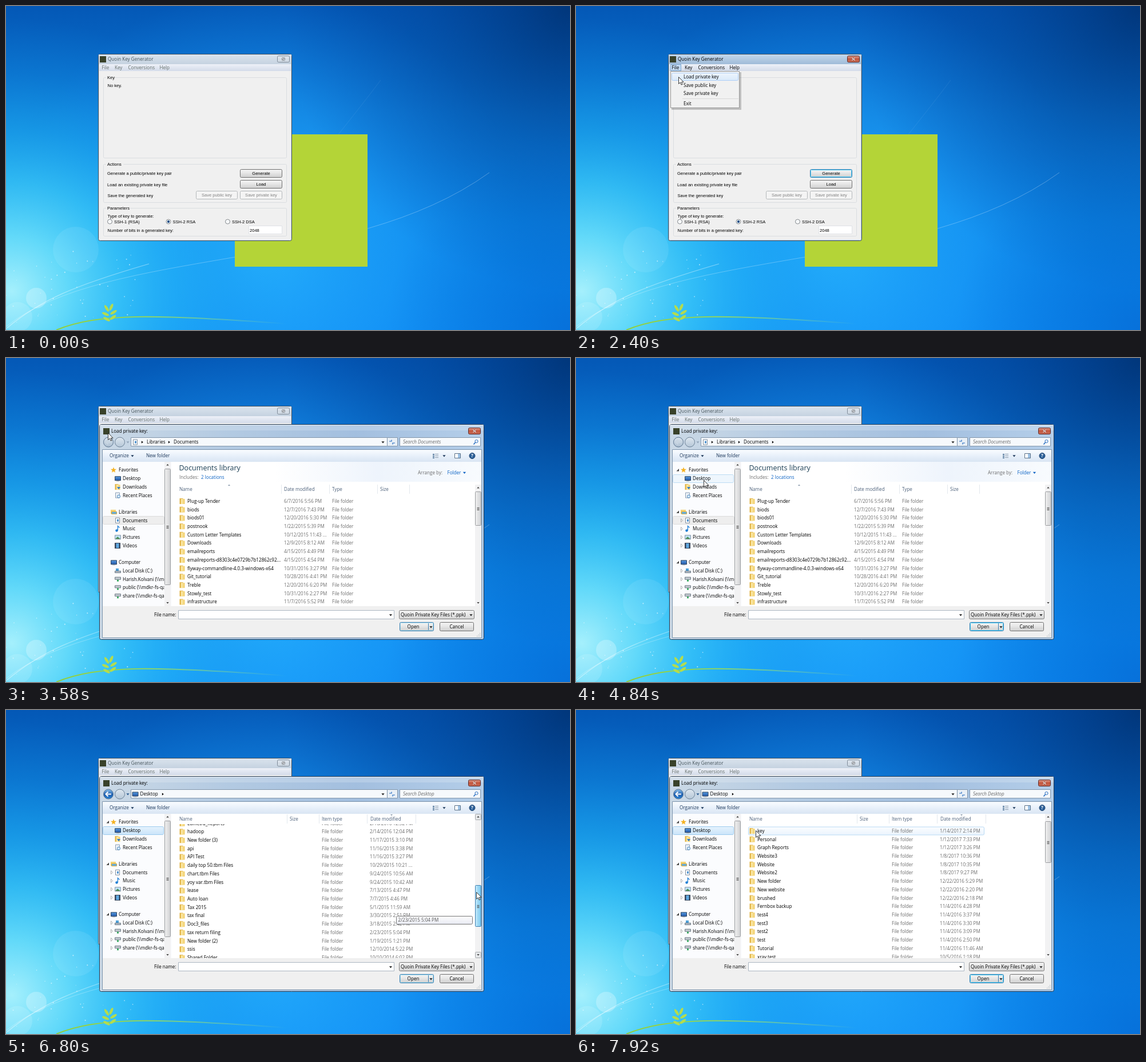
Recreate the animation shown at these times as an HTML page with a canvas. Size 986 by 568 pixels, loop 8 s.

```html
<!DOCTYPE html>
<html lang="en">
<head>
<meta charset="utf-8">
<title>Load a private key</title>
<style>
html, body { margin: 0; width: 100%; height: 100%; overflow: hidden; background: #0a74d0; }
canvas { display: block; }
</style>
</head>
<body>
<canvas id="stage" width="986" height="568"></canvas>
<script>
const W = 986, H = 568, LOOP = 8000, ROW = 14.71;
const g = document.getElementById('stage').getContext('2d');
const UI = '8.1px "Open Sans", "Noto Sans", sans-serif';
const CLASSIC = '7.55px "Liberation Sans", Arial, sans-serif';
const NAVY = '#1e395b', LINK = '#0a62c4', GREY = '#6d6d6d';

// ---------- drawing helpers ----------
function stops(gr, colors) {
  colors.forEach((c, i) => gr.addColorStop(i / (colors.length - 1), c));
  return gr;
}
const down = (y0, y1, ...colors) => stops(g.createLinearGradient(0, y0, 0, y1), colors);
const across = (x0, x1, ...colors) => stops(g.createLinearGradient(x0, 0, x1, 0), colors);

function box(x, y, w, h, fill, line, r = 0) {
  g.beginPath();
  if (line) g.roundRect(x + .5, y + .5, w - 1, h - 1, r);
  else g.roundRect(x, y, w, h, r);
  if (fill) { g.fillStyle = fill; g.fill(); }
  if (line) { g.strokeStyle = line; g.lineWidth = 1; g.stroke(); }
}
function disc(x, y, r, fill, line) {
  g.beginPath();
  g.arc(x, y, r, 0, 7);
  if (fill) { g.fillStyle = fill; g.fill(); }
  if (line) { g.strokeStyle = line; g.lineWidth = 1; g.stroke(); }
}
// y is the middle of the capitals
function text(s, x, y, color = '#000', font = UI, align = 'left') {
  g.font = font;
  g.fillStyle = color;
  g.textAlign = align;
  g.fillText(s, x, y + 2.9);
}
function path(points, color, width, close) {
  g.beginPath();
  points.forEach(([x, y]) => g.lineTo(x, y));
  if (close) g.closePath();
  if (width) { g.strokeStyle = color; g.lineWidth = width; g.stroke(); }
  else { g.fillStyle = color; g.fill(); }
}
function arrow(x, y, turn = 0, color = '#222', size = 2.6) {
  g.save();
  g.translate(x, y);
  g.rotate(turn * Math.PI / 2);
  path([[-size, -size / 2], [size, -size / 2], [0, size / 2 + .6]], color);
  g.restore();
}
function clipped(x, y, w, h, paint) {
  g.save();
  g.beginPath();
  g.rect(x, y, w, h);
  g.clip();
  paint();
  g.restore();
}
function faded(alpha, paint) {
  if (alpha <= 0) return;
  g.save();
  g.globalAlpha *= Math.min(1, alpha);
  paint();
  g.restore();
}
function button(x, y, w, h, label, font, { glow = 0, off } = {}) {
  const fill = off ? '#f4f4f4' : down(y, y + h, '#f4f4f4', '#ececec', '#dcdcdc', '#cfcfcf');
  box(x, y, w, h, fill, off ? '#b4b8ba' : glow ? '#3c7fb1' : '#707070', 2);
  if (glow) faded(glow, () => box(x + 1, y + 1, w - 2, h - 2, null, '#3cc8f4', 1));
  text(label, x + w / 2, y + h / 2, off ? '#838383' : '#000', font, 'center');
}
function closeButton(x, y, w, h, red) {
  box(x, y, w, h, red ? down(y, y + h, '#e0a596', '#c4553c', '#c9715c') : down(y, y + h, '#dfe6ee', '#ccd6e1'),
    red ? '#5a2a2a' : '#7f8b98', 2);
  const cx = x + w / 2, cy = y + h / 2;
  for (const d of [-1, 1]) {
    const line = [[cx - 2.5, cy - 2.2 * d], [cx + 2.5, cy + 2.2 * d]];
    path(line, red ? '#8b3a2b' : '#444d57', 2.6);
    path(line, '#fff', 1.3);
  }
}
const appIcon = (x, y) => box(x, y, 11, 11, '#39422a');

const icons = {
  folder(x, y) {
    box(x - 4.5, y - 5, 6, 10, '#e3b64c');
    box(x - 2, y - 4, 6.5, 9, across(x - 2, x + 5, '#fdeeb0', '#efc95f'));
  },
  star(x, y) {
    path([...Array(10)].map((_, i) => {
      const r = i % 2 ? 2.3 : 5.3, a = i * Math.PI / 5 - Math.PI / 2;
      return [x + r * Math.cos(a), y + r * Math.sin(a)];
    }), '#f5b324', 0, true);
  },
  screen(x, y) {
    box(x - 5, y - 4, 11, 8, down(y - 4, y + 4, '#5aa0e6', '#1c4fa0'), '#34485f');
    box(x - 2, y + 4, 5, 1, '#8a98a8');
  },
  down(x, y) {
    icons.folder(x, y);
    arrow(x + 2, y + 2, 0, '#2374d0', 3.2);
  },
  recent(x, y) {
    box(x - 4, y - 5, 8, 10, '#eef3f8', '#8a9db4');
    disc(x + 2, y + 2, 2.6, '#d7ecff', '#4d85b8');
  },
  library(x, y) {
    box(x - 5, y - 4, 9, 7, '#f4d273');
    box(x - 4, y - 1, 10, 5, '#62b0e6', '#d9a93a');
  },
  doc(x, y) {
    box(x - 4, y - 5, 8, 10, '#fff', '#7f8d9c');
    box(x - 1, y - 2, 3, 4, '#4f93d0');
  },
  music(x, y) {
    disc(x - 1.5, y + 3, 2.2, '#1f7fd4');
    path([[x + .4, y + 3], [x + .4, y - 5], [x + 3.5, y - 2]], '#1f7fd4', 1.3);
  },
  picture(x, y) {
    box(x - 5, y - 4, 11, 8, '#bfe2f7', '#8a98a8');
    path([[x - 4, y + 3], [x, y - 1], [x + 5, y + 3]], '#4a8f55');
  },
  video(x, y) {
    box(x - 5, y - 5, 10, 10, '#39465a');
    box(x - 2.5, y - 4, 5, 8, '#5fa8e2');
  },
  drive(x, y) {
    box(x - 5, y, 11, 4, '#b9c2cb', '#6d7883');
    box(x - 3, y - 4, 5, 4, '#4d9fd6');
  },
  net(x, y) {
    box(x - 5, y - 4, 11, 5, '#c3cbd2', '#707a84');
    box(x - 1, y + 1, 3, 3, '#38a860');
  },
  user(x, y) {
    icons.folder(x, y);
    disc(x + 1, y + 1, 2.2, '#4d7f5d');
  },
  shortcut: (x, y) => box(x - 4.5, y - 4.5, 9, 9, '#3a8fd8'),
};

// ---------- wallpaper ----------
function paintWallpaper() {
  const wash = paint => { g.fillStyle = paint; g.fillRect(0, 0, W, H); };
  const glow = (x, y, r, ...colors) => wash(stops(g.createRadialGradient(x, y, 0, x, y, r), colors));
  wash(down(0, H, '#0458b6', '#0a76d4', '#0b88ea', '#0a88f2'));
  glow(450, 430, 460, 'rgba(40,180,255,.85)', 'rgba(34,164,252,.5)', 'rgba(24,140,240,0)');
  glow(10, 500, 480, 'rgba(170,243,253,.97)', 'rgba(110,228,251,.88)', 'rgba(62,206,248,.72)',
    'rgba(36,184,244,.45)', 'rgba(24,160,236,.2)', 'rgba(20,150,235,0)');
  glow(986, 0, 500, 'rgba(0,46,108,.8)', 'rgba(0,56,135,.36)', 'rgba(0,60,150,0)');
  glow(986, 568, 320, 'rgba(0,70,175,.35)', 'rgba(0,80,180,0)');

  const curve = (color, width, ...p) => {
    g.beginPath();
    g.moveTo(p[0], p[1]);
    g.bezierCurveTo(...p.slice(2));
    g.strokeStyle = color;
    g.lineWidth = width;
    g.stroke();
  };
  curve('rgba(255,255,255,.28)', 1, 0, 562, 180, 420, 600, 470, 845, 292);
  curve('rgba(255,255,255,.4)', 1.2, 0, 566, 60, 515, 120, 490, 250, 452);
  curve('rgba(255,255,255,.08)', 1, 655, 130, 610, 190, 560, 250, 500, 330);
  disc(122, 427, 40, 'rgba(255,255,255,.08)');
  disc(53, 512, 18, 'rgba(255,255,255,.25)');
  disc(20, 545, 26, 'rgba(255,255,255,.12)');

  let seed = 7;
  const random = () => (seed = seed * 16807 % 2147483647) / 2147483647;
  for (let i = 0; i < 45; i++)
    disc(random() * 240, 430 + random() * 125, .4 + random() * .7, 'rgba(255,255,255,.6)');

  curve(across(88, 490, '#8fce3c', '#9ad84a', 'rgba(150,225,120,.5)', 'rgba(150,225,160,0)'), 2,
    88, 568, 160, 538, 260, 540, 490, 557);
  for (const [x, y, a] of [[176, 530, 1], [184, 528, 2], [174, 540, .4], [188, 537, 2.6], [176, 549, .5], [187, 546, 2.5]]) {
    g.beginPath();
    g.ellipse(x, y, 6.5, 2.4, a, 0, 7);
    g.fillStyle = '#b5dc4c';
    g.fill();
  }
  box(400, 225, 232, 232, '#b4d437');
}

// ---------- key generator window ----------
function generator(t) {
  const active = t >= 1930 && t < 3110;
  box(161, 84, 339, 328, active ? '#a9c4e0' : '#cfdae6', '#46535f', 3);
  box(162, 85, 337, 17, active ? down(85, 102, '#c4d8ec', '#9fbbd8') : down(85, 102, '#dbe4ee', '#c5d2e0'));
  box(163, 102, 335, 12, down(102, 114, '#eef1f8', '#d3dbe9'));
  box(163, 114, 335, 296, '#f0f0f0');
  appIcon(164, 88);
  text('Quoin Key Generator', 178, 93, active ? '#000' : '#46555c');
  closeButton(474, 87, 22, 12, active);
  if (t >= 2010 && t < 3030) box(165, 102, 19, 12, '#c3dbf3', '#7da7d0');
  const menuColor = active ? '#000' : '#66706c';
  [['File', 167.5], ['Key', 190], ['Conversions', 213.5], ['Help', 268.5]]
    .forEach(([s, x]) => text(s, x, 108, menuColor));

  const label = (s, x, y) => text(s, x, y, '#000', CLASSIC);
  [['Key', 125, 142], ['Actions', 277, 68], ['Parameters', 354, 50]].forEach(([s, y, h]) => {
    box(170, y, 321, h, null, '#dadde0', 2);
    box(175, y - 1, s.length * 3.9 + 3, 3, '#f0f0f0');
    label(s, 177, y);
  });
  label('No key.', 177.5, 139);
  label('Generate a public/private key pair', 177, 293.5);
  label('Load an existing private key file', 177, 313.5);
  label('Save the generated key', 177.5, 332);
  label('Type of key to generate:', 177.5, 368);
  label('Number of bits in a generated key:', 177.5, 393);
  button(409, 286, 74, 15, 'Generate', CLASSIC, { glow: t >= 1930 ? .9 : 0 });
  button(409, 305, 74, 15, 'Load', CLASSIC);
  button(332, 324, 73, 15, 'Save public key', CLASSIC, { off: true });
  button(409, 324, 74, 15, 'Save private key', CLASSIC, { off: true });
  [['SSH-1 (RSA)', 181.5], ['SSH-2 RSA', 284], ['SSH-2 DSA', 387.5]].forEach(([s, x], i) => {
    disc(x, 378, 4, '#f7f9fa', '#85898d');
    if (i === 1) disc(x, 378, 2.2, '#1b4f86');
    label(s, x + 7.5, 378);
  });
  box(424, 385, 59, 15, '#fff', '#dfe2e6');
  label('2048', 426, 393);

  if (t >= 2010 && t < 3030) faded(t < 2090 ? .6 : 1, () => {
    box(167, 116, 122, 66, 'rgba(0,0,0,.2)');
    box(165, 114, 121, 65, '#f1f1f1', '#979797');
    if (t >= 2320) box(167, 117, 117, 14, down(117, 131, '#eef5fd', '#d9e9fa'), '#aecff7', 2);
    ['Load private key', 'Save public key', 'Save private key', 'Exit']
      .forEach((s, i) => text(s, 188, 124 + i * 14.7 + (i === 3 ? 3 : 0)));
    box(186, 162, 98, 1, '#d8d8d8');
  });
}

// ---------- file dialog ----------
const parse = s => s.trim().split('\n').map(line => line.split('|'));
const documents = parse(`
Plug-up Tender|6/7/2016 5:56 PM
biods|12/7/2016 7:43 PM
biods01|12/20/2016 5:30 PM
postnook|1/22/2015 5:39 PM
Custom Letter Templates|10/12/2015 11:43 ...
Downloads|12/9/2015 8:12 AM
emailreports|4/15/2015 4:49 PM
emailreports-d8303c4e0729b7b12862c92...|4/15/2015 4:54 PM
flyway-commandline-4.0.3-windows-x64|10/31/2016 3:27 PM
Git_tutorial|10/28/2016 4:41 PM
Treble|12/20/2016 6:20 PM
Stowly_test|10/31/2016 2:27 PM
infrastructure|11/7/2016 5:52 PM`);
const desktop = parse(`
key|1/14/2017 2:14 PM
Personal|1/12/2017 7:33 PM
Graph Reports|1/12/2017 3:26 PM
Website3|1/8/2017 10:36 PM
Website|1/8/2017 10:35 PM
Website2|1/8/2017 9:27 PM
New folder|12/22/2016 5:29 PM
New website|12/22/2016 2:20 PM
brushed|12/22/2016 2:18 PM
Fernbox backup|11/4/2016 4:28 PM
test4|11/4/2016 3:37 PM
test3|11/4/2016 3:30 PM
test2|11/4/2016 3:09 PM
test|11/4/2016 2:50 PM
Tutorial|11/4/2016 11:46 AM
xray test|10/5/2016 1:18 PM
Lumetra_Reports|2/16/2016 12:52 PM
hadoop|2/14/2016 12:04 PM
New folder (3)|11/17/2015 3:10 PM
api|11/16/2015 3:38 PM
API Test|11/16/2015 3:27 PM
daily top 50.tbm Files|10/29/2015 10:21 ...
chart.tbm Files|9/24/2015 10:56 AM
yoy var.tbm Files|9/24/2015 10:42 AM
lease|7/13/2015 4:47 PM
Auto loan|7/7/2015 4:46 PM
Tax 2015|5/1/2015 11:59 AM
tax final|3/30/2015 2:51 PM
Doc3_files|3/18/2015 2:42 PM
tax return filing|2/23/2015 5:04 PM
New folder (2)|1/19/2015 1:21 PM
ssis|12/10/2014 5:22 PM
Shared Folder|10/10/2014 6:02 PM
Passport|8/11/2014 7:14 PM
QVR|11/3/2015 3:23 PM|shortcut
Network||net
Computer||screen
Harish Kolvani||user
Libraries||library`);
// name, icon, row; headings sit further left
const tree = [
  ['Favorites', 'star', 0, 1], ['Desktop', 'screen', 1], ['Downloads', 'down', 2], ['Recent Places', 'recent', 3],
  ['Libraries', 'library', 5, 1], ['Documents', 'doc', 6], ['Music', 'music', 7], ['Pictures', 'picture', 8], ['Videos', 'video', 9],
  ['Computer', 'screen', 11, 1], ['Local Disk (C:)', 'drive', 12], ['Harish.Kolvani (\\\\mdkr', 'net', 13],
  ['public (\\\\mdkr-fs-qa', 'net', 14], ['share (\\\\mdkr-fs-qa', 'net', 15]];

function scrollbar(x, top, thumb, size, { hot, w = 11 } = {}) {
  box(x, top, w, 435 - top, '#f2f2f3');
  if (hot) [top, 424].forEach(y => box(x, y, w, 11, '#e6e8ea', '#a5a9ad', 1));
  arrow(x + w / 2, top + 5.5, 2, '#444', 2.2);
  arrow(x + w / 2, 429, 0, '#444', 2.2);
  const fill = hot ? across(x, x + w, '#c9ecfb', '#72c4ee') : across(x, x + w, '#f2f2f2', '#cfd0d2');
  box(x, thumb, w, size, fill, hot ? '#3c7fb1' : '#9a9c9f', 1);
  for (let i = -1; i < 2; i++) box(x + w / 2 - 2, Math.round(thumb + size / 2) + i * 2, 4, 1, '#555');
}

function sidebar(t) {
  const onDesktop = t >= 5150;
  box(169, 182, 121, 253, '#fbfcfe');
  if (onDesktop) box(169, 204, 107, 15, down(204, 219, '#e6f3fd', '#c9e4fa'), '#9ccbee', 2);
  else {
    box(169, 277, 108, 15, '#eeeeee', '#dcdcdc', 2);
    if (t >= 4600) box(169, 204, 107, 15, '#eef6fd', '#bcdcf4', 2);
  }
  clipped(169, 182, 107.5, 253, () => tree.forEach(([name, icon, row, head]) => {
    const y = 196.5 + row * ROW;
    icons[icon](head ? 188 : 195, y);
    text(name, head ? 197 : 204, y);
    faded((t - 4200) / 300, () => {
      if (head) path([[175.5, y + 2], [180, y + 2], [180, y - 2.5]], '#444', 0, true);
      else if (row > 4) path([[183.5, y - 3], [186.7, y], [183.5, y + 3]], '#a0a0a0', .8, true);
    });
  }));
  scrollbar(277, 182, 194, 204);
}

function columns(y, top, names, lines) {
  names.forEach(([s, x]) => text(s, x, y, '#4c607a'));
  lines.forEach(x => box(x, top, 1, 16, '#e3e8ee'));
}
const rowBox = (y, fill, line) => box(301, y - 7.5, 413, 15, fill, line, 2);

function documentList() {
  box(290, 182, 541, 35, across(290, 831, '#fff', '#fff', '#eef4fc', '#f8fbfe'));
  text('Documents library', 302.5, 194, '#1c3f54', '12.5px "Open Sans", "Noto Sans", sans-serif');
  text('Includes:', 303, 209, GREY);
  text('2 locations', 341, 209, LINK);
  text('Arrange by:', 720, 201, GREY);
  text('Folder', 771.5, 201, LINK);
  arrow(801.5, 201, 0, LINK);
  columns(230, 222, [['Name', 303], ['Date modified', 486], ['Type', 570], ['Size', 654]], [481, 565, 649, 705]);
  arrow(390, 223, 2, '#8a9aac', 2);
  documents.forEach(([name, date], i) => {
    const y = 251 + i * ROW;
    icons.folder(308, y);
    text(name, 317, y);
    text(date, 486, y, GREY);
    text('File folder', 570, y, GREY);
  });
  scrollbar(820, 222, 234, 60);
}

function desktopList(t, cursor) {
  const dragging = t >= 6640 && t < 7420;
  const thumb = t < 6640 ? 350 : dragging ? Math.max(195, Math.min(350, cursor.y - 12)) : 195;
  const scroll = (thumb - 195) / 155 * 344.1;
  const rowY = i => 212 + i * ROW - scroll;
  const hover = cursor.x > 301 && cursor.x < 714 && cursor.y > 200 && !dragging
    ? Math.floor((cursor.y - rowY(-.5)) / ROW) : -1;
  columns(191.5, 183, [['Name', 303], ['Size', 496], ['Item type', 552], ['Date modified', 637]], [491, 547, 631, 716]);
  arrow(674, 184, 0, '#8a9aac', 2);
  clipped(290, 200, 529, 235, () => desktop.forEach(([name, date, icon = 'folder'], i) => {
    const y = rowY(i);
    if (y < 190 || y > 445) return;
    if (i === 38) rowBox(y, down(y - 7, y + 7, '#fafafa', '#ebebeb'), '#d9d9d9');
    if (i === hover) rowBox(y, down(y - 7, y + 7, '#fbfdff', '#ebf4fd'), '#b8d9f4');
    icons[icon](308, y);
    text(name, 317, y);
    text(date, 636, y, GREY);
    if (date) text(icon === 'shortcut' ? 'Internet Shortcut' : 'File folder', 552, y, GREY);
    if (icon === 'shortcut') text('1 KB', 543, y, GREY, UI, 'right');
  }));
  scrollbar(820, 182, thumb, 73, { hot: dragging || t >= 6490 && t < 6640 });
  if (dragging && t >= 6720) {
    const top = thumb + 54;
    box(682, top, 134, 15, down(top, top + 15, '#fff', '#e6e8f1'), '#767676', 2);
    text(desktop[Math.min(38, Math.round((177 + scroll) / ROW))][1], 685.5, top + 7.5, '#575757');
  }
}

function dialog(t, cursor) {
  const onDesktop = t >= 5150;
  box(163, 116, 673, 378, across(163, 836, '#cbd9e6', '#b3cae2', '#a3bfdf', '#b4cee9'), '#20364e', 3);
  box(164, 117, 671, 10, 'rgba(255,255,255,.18)');
  box(164, 117, 671, 1, 'rgba(255,255,255,.7)');
  appIcon(170, 123);
  text('Load private key:', 184, 128.5);
  closeButton(808, 122, 22, 12, true);

  disc(179, 147.5, 8.5, onDesktop ? down(139, 157, '#8cc3ee', '#1c5cae', '#2f8ad8') : down(139, 157, '#dce6ef', '#a9bccf'), '#5d7690');
  disc(199, 147.5, 8.5, down(139, 157, '#dfe8f0', '#b3c5d6'), '#6c8298');
  const back = onDesktop ? '#fff' : '#c9d6e2';
  path([[184, 147.5], [175, 147.5]], back, 2);
  path([[178.5, 143.5], [174.5, 147.5], [178.5, 151.5]], back, 2);
  arrow(213, 147.5, 0, onDesktop ? '#2b5a8f' : '#94a7ba');

  box(218, 139, 449, 16, '#f6f9fc', '#8296ab');
  box(666, 139, 19, 16, '#e9f0f7', '#8296ab');
  box(688, 139, 142, 16, '#f6f9fc', '#8296ab');
  arrow(659, 147.5);
  path([[670, 146], [674, 146], [674, 143.5]], '#2a6ec0', 1.2);
  path([[680, 149], [676, 149], [676, 151.5]], '#2a6ec0', 1.2);
  if (onDesktop) {
    icons.screen(225.5, 147.5);
    text('Desktop', 234.5, 147.5);
    if (t >= 6010) arrow(274, 147.5, 3, '#000', 2.3);
  } else {
    icons.doc(226, 147.5);
    arrow(238, 147.5, 3, '#000', 2.3);
    text('Libraries', 246, 147.5);
    arrow(285, 147.5, 3, '#000', 2.3);
    text('Documents', 293, 147.5);
    if (t >= 3730) arrow(344, 147.5, 3, '#000', 2.3);
  }
  text('Search ' + (onDesktop ? 'Desktop' : 'Documents'), 694, 147.5, GREY, 'italic ' + UI);
  disc(822.5, 146, 2.6, null, '#2a6ec0');
  path([[820.5, 148], [817.5, 151.5]], '#2a6ec0', 1.6);

  box(168, 160, 664, 331, '#f0f0f0', '#7c93ab');
  box(169, 161, 662, 21, down(161, 182, '#f9fcff', '#e8f0fa', '#d9e5f3'));
  text('Organize', 181, 171.5, NAVY);
  arrow(221, 171.5, 0, NAVY);
  text('New folder', 245, 171.5, NAVY);
  for (let i = 0; i < 3; i++) {
    box(746, 168 + i * 3, 3, 2, '#5d7f9f');
    box(750, 168 + i * 3, 6, 1, '#8a9aac');
  }
  arrow(766, 171.5, 0, NAVY);
  box(784, 167, 11, 9, '#fff', '#5d7288');
  box(790, 168, 4, 7, '#9fc3e6');
  disc(815, 171.5, 5, '#2b5f98', '#1d416c');
  text('?', 815, 171.5, '#fff', 'bold ' + UI, 'center');

  box(169, 182, 662, 253, '#fff');
  sidebar(t);
  onDesktop ? desktopList(t, cursor) : documentList();

  text('File name:', 297.5, 450, '#000', UI, 'right');
  box(301, 442, 378, 16, '#fff', '#abb6c2');
  arrow(672.5, 450.5);
  box(687, 442, 132, 16, down(442, 458, '#f4f4f4', '#e6e6e6', '#d2d2d2'), '#7d7d7d', 2);
  text('Quoin Private Key Files (*.ppk)', 690, 450);
  arrow(813, 450.5);
  const pulse = .65 + .35 * Math.cos((t - 7920) / 3000 * 2 * Math.PI);
  button(688, 463, 60, 16, '', UI, { glow: pulse });
  text('Open', 712, 471, '#000', UI, 'center');
  box(738, 465, 1, 12, '#3c7fb1');
  arrow(743, 471.5);
  button(758, 463, 60, 16, 'Cancel', UI);
  for (let i = 0; i < 3; i++)
    for (let j = 0; j <= i; j++) box(828 - j * 2.5, 482 + i * 2.5, 1.2, 1.2, '#b5bcc4');
}

// ---------- pointer ----------
const moves = [
  [290, 791, 512], [1070, 203, 139], [1460, 180, 109], [1540, 180, 109], [1700, 175, 108], [2160, 175, 108],
  [2480, 180, 127], [3340, 180, 127], [3580, 178, 131], [3880, 178, 131], [4760, 224, 215], [5000, 219, 212],
  [5070, 219, 212], [5690, 389, 222], [5930, 470, 250], [6560, 822, 362], [6650, 822, 362], [6785, 822, 319],
  [7030, 822, 235], [7120, 822, 235], [7360, 822, 207], [7420, 822, 207], [7880, 314, 211], [8000, 314, 211]];

function pointer(time) {
  // the screen was sampled about 13 times a second
  const t = 290 + Math.floor((time - 290) / 78.3 + .15) * 78.3;
  const i = Math.max(1, moves.findIndex(m => m[0] > t));
  const [t0, x0, y0] = moves[i - 1], [t1, x1, y1] = moves[i];
  const u = Math.max(0, Math.min(1, (t - t0) / (t1 - t0))), e = u * u * (3 - 2 * u);
  return { x: Math.round(x0 + (x1 - x0) * e), y: Math.round(y0 + (y1 - y0) * e) };
}
function drawPointer({ x, y }) {
  const shape = [[0, 0], [0, 12], [2.8, 9.4], [4.6, 13.6], [6.6, 12.8], [4.8, 8.8], [8.6, 8.8]]
    .map(([a, b]) => [x + .5 + a, y + .5 + b]);
  path(shape, '#fff', 0, true);
  path(shape, '#222', .9, true);
}

// ---------- playback ----------
paintWallpaper();
const wallpaper = document.createElement('canvas');
wallpaper.width = W;
wallpaper.height = H;
wallpaper.getContext('2d').drawImage(g.canvas, 0, 0);

function frame() {
  const t = performance.now() % LOOP;
  const cursor = pointer(t);
  g.drawImage(wallpaper, 0, 0);
  generator(t);
  if (t >= 3420) faded(t < 3500 ? .35 : t < 3580 ? .75 : 1, () => dialog(t, cursor));
  if (t >= 290) drawPointer(cursor);
  requestAnimationFrame(frame);
}
frame();
</script>
</body>
</html>
```
